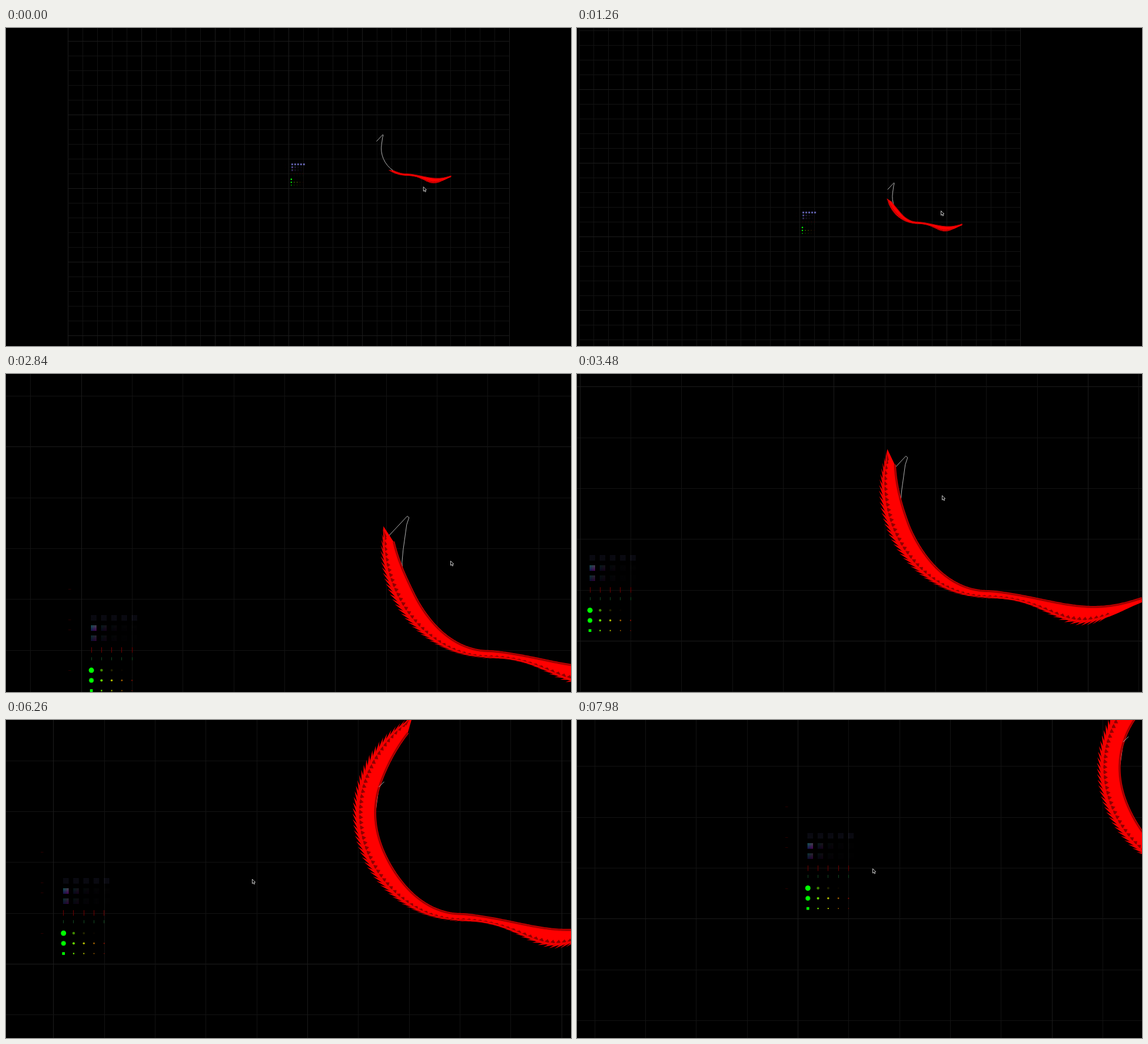
These frames come from a looping animation (960 px wide and 540 px high, 8 s). An HTML page with a canvas:

```html
<!DOCTYPE html>
<html lang="en">
<head>
<meta charset="utf-8">
<title>Ribbon on a grid</title>
<style>
  html, body { margin: 0; width: 100%; height: 100%; overflow: hidden; background: #000; }
  canvas { display: block; }
</style>
</head>
<body>
<canvas id="stage" width="960" height="540"></canvas>
<script>
const ctx = document.getElementById('stage').getContext('2d');
const LOOP = 8000, ZOOM = 3.453, MID = { x: 480, y: 271.7 };

// Moves: start ms, duration ms, dx, dy. Each one eases out.
const cameraMoves = [[0, 900, 102, -82], [2850, 980, 40.8, 33.8], [6100, 1250, -112.4, 29.2]];
const pointerMoves = [
  [0, 750, -102, 82], [950, 300, 11, -41], [1500, 1000, 137, 7], [2850, 794, -141, -116],
  [5000, 900, -312, 99], [6100, 990, 388, -101], [7200, 650, -188, 53]
];

const clamp = k => Math.max(0, Math.min(1, k));
const easeOut = k => 1 - (1 - clamp(k)) ** 2;

function travel(moves, x, y, t) {
  for (const [start, duration, dx, dy] of moves) {
    const k = easeOut((t - start) / duration);
    x += dx * k;
    y += dy * k;
  }
  return [x, y];
}

function trace(points) {
  ctx.beginPath();
  points.forEach(p => ctx.lineTo(p[0], p[1]));
}

function fillShape(points, color) {
  trace(points);
  ctx.fillStyle = color;
  ctx.fill();
}

function strokeLine(points, color, width) {
  trace(points);
  ctx.strokeStyle = color;
  ctx.lineWidth = width;
  ctx.stroke();
}

// The ribbon: a wavy tail that runs into a circular arc.
const TAIL = 262, RADIUS = 184, HUB = { x: 680, y: 182 };
const polar = (r, a) => [HUB.x - r * Math.cos(a), HUB.y + r * Math.sin(a)];
const distanceAt = angle => TAIL + RADIUS * (Math.PI / 2 - angle);

// Point at distance d from the tail end; side 0 is the outer edge, 1 the inner edge.
function ribbonPoint(d, side) {
  if (d > TAIL) {
    const angle = Math.PI / 2 - (d - TAIL) / RADIUS;
    const inner = 146.5 + 25.5 * Math.max(0, Math.sin(angle)) ** 4;
    return polar(RADIUS + (inner - RADIUS) * side, angle);
  }
  const v = 1 - d / TAIL;
  const top = 354 + 12 * v + 19 * Math.sin(Math.PI * v ** 1.6);
  const width = 5 + 7 * (1 - v) ** 4 + 27 * Math.exp(-(((v - 0.58) / 0.18) ** 2) / 2);
  return [HUB.x + TAIL * v, top + width * (1 - side)];
}

function tipAngle(t) {
  const degrees = t < 1260 ? 54.9 - 44.2 * t / 1260 : 10.7 - 14.8 * (t - 1260) / 1000;
  return degrees * Math.PI / 180;
}

function drawGuide(scale) {
  const points = [[504, 164], [541, 124.5], [544, 127], [540, 139]];
  for (let a = 0; a < 80; a += 8) points.push(polar(146 + 0.42 * a, a * Math.PI / 180));
  strokeLine(points, '#c4c4c4', 0.9 / scale);
}

function drawRibbon(t) {
  const tip = distanceAt(tipAngle(t));
  const taper = d => 1 - 0.65 * clamp(1 - (tip - d) / 140) ** 2;
  const at = (d, side) => ribbonPoint(d, side * taper(d));
  const outer = [], inner = [];
  for (let d = 0; d < tip - 14; d += 3) {
    outer.push(at(d, 0.16 * clamp((d - 40) / 40)));
    if (d < tip - 22) inner.push(at(d, 1));
  }
  outer.push(ribbonPoint(tip, 0));
  fillShape(outer.concat(inner.slice().reverse()), '#ff0000');
  strokeLine(inner, '#d80000', 4);
  strokeLine(inner, '#8c0000', 1.6);

  const spike = d => {
    fillShape([at(d, -0.02), at(d - 16, 0.32), at(d - 30, 0.25)], '#f40000');
    fillShape([at(d - 7, 0.14), at(d - 17, 0.46), at(d - 20, 0.3)], '#900000');
  };
  for (let d = 75; d < tip; d += 9.5) spike(d);
  spike(tip);
}

function drawGrid(ox, oy, s) {
  const reach = 375 * s;
  const line = (x, y, w, h, color) => {
    ctx.fillStyle = color;
    ctx.fillRect(x, y, w, h);
  };
  for (let i = -15; i <= 15; i++) {
    const color = i % 5 ? '#121212' : '#1b1b1b';
    line(Math.round(ox + 25 * i * s), oy - reach, 1, 2 * reach, color);
    line(ox - reach, Math.round(oy + 25 * i * s), 2 * reach, 1, color);
  }
}

function drawSamples(ox, oy, s) {
  const X = x => ox + x * s, Y = y => oy + y * s;
  const scale = s / ZOOM;
  const disc = (x, y, r) => {
    ctx.beginPath();
    ctx.arc(x, y, r, 0, 7);
    ctx.fill();
  };
  const bar = (x, y, w, h, color) => {
    ctx.fillStyle = color;
    ctx.fillRect(Math.round(x), Math.round(y), w, h);
  };

  for (let col = 0; col < 5; col++) {
    const x = X(5 + 5 * col), r = (col ? 0.75 - 0.1 * col : 1.3) * s;
    ctx.fillStyle = `hsl(${120 - 28 * col}, 100%, ${50 - 6 * col}%)`;
    disc(x, Y(-15), r);
    ctx.globalAlpha = 0.75;
    disc(x, Y(-10), r * 0.95);
    ctx.globalAlpha = 1;
    disc(x, Y(-10), r * 0.7);
    const half = r * 0.52;
    ctx.fillRect(x - half, Y(-5) - half, half * 2, half * 2);

    ctx.globalAlpha = scale;
    bar(x - 0.5, Y(-26.2), 1, 2.7 * s, '#700000');
    bar(x - 0.5, Y(-21.4), 1, 1.5 * s, '#124a22');

    ctx.globalCompositeOperation = 'lighter';
    for (let row = 0; row < 3; row++) {
      ctx.globalAlpha = row ? 0.32 ** col * 0.6 ** (row - 1) * scale ** 1.5 : 0.22;
      for (let i = 0; i < 5; i++) {
        for (let j = 0; j < 5; j++) {
          ctx.fillStyle = row ? `rgb(${60 + i * 35},${220 - j * 38 - i * 12},235)` : '#7878d8';
          ctx.fillRect(X(4.9 + 5 * col + i * 0.55), Y(-42 + 5 * row + j * 0.55), 1.1, 1.1);
        }
      }
    }
    ctx.globalCompositeOperation = 'source-over';
  }
  ctx.globalAlpha = scale;
  for (const y of [-55, -40, -35, -15]) bar(X(-6.2), Y(y), 1.3 * s, 1, '#2a0000');
  ctx.globalAlpha = 1;
}

function drawPointer(x, y) {
  ctx.save();
  ctx.translate(x + 0.5, y + 0.5);
  const arrow = [[0, 0], [0, 7.5], [1.8, 6], [3, 8.6], [4.2, 8], [3.1, 5.5], [5.2, 5.2], [0, 0]];
  fillShape(arrow, '#000');
  strokeLine(arrow, '#d8d8d8', 0.9);
  ctx.restore();
}

function draw(t) {
  const s = ZOOM ** clamp((t - 1680) / 820), scale = s / ZOOM;
  const [cx, cy] = travel(cameraMoves, 0, 0, t);
  const ox = MID.x - cx * s, oy = MID.y - cy * s;

  ctx.fillStyle = '#000';
  ctx.fillRect(0, 0, 960, 540);
  drawGrid(ox, oy, s);
  drawSamples(ox, oy, s);

  ctx.save();
  ctx.translate(ox, oy);
  ctx.scale(scale, scale);
  ctx.translate(13, -438);
  drawGuide(scale);
  drawRibbon(t);
  if (t > 5760) strokeLine([[540, 138], [549, 129]], '#c4c4c4', 0.9);
  ctx.restore();

  drawPointer(...travel(pointerMoves, 709, 269, t));
}

const start = performance.now();
function tick() {
  draw((performance.now() - start) % LOOP);
  requestAnimationFrame(tick);
}
tick();
</script>
</body>
</html>
```
